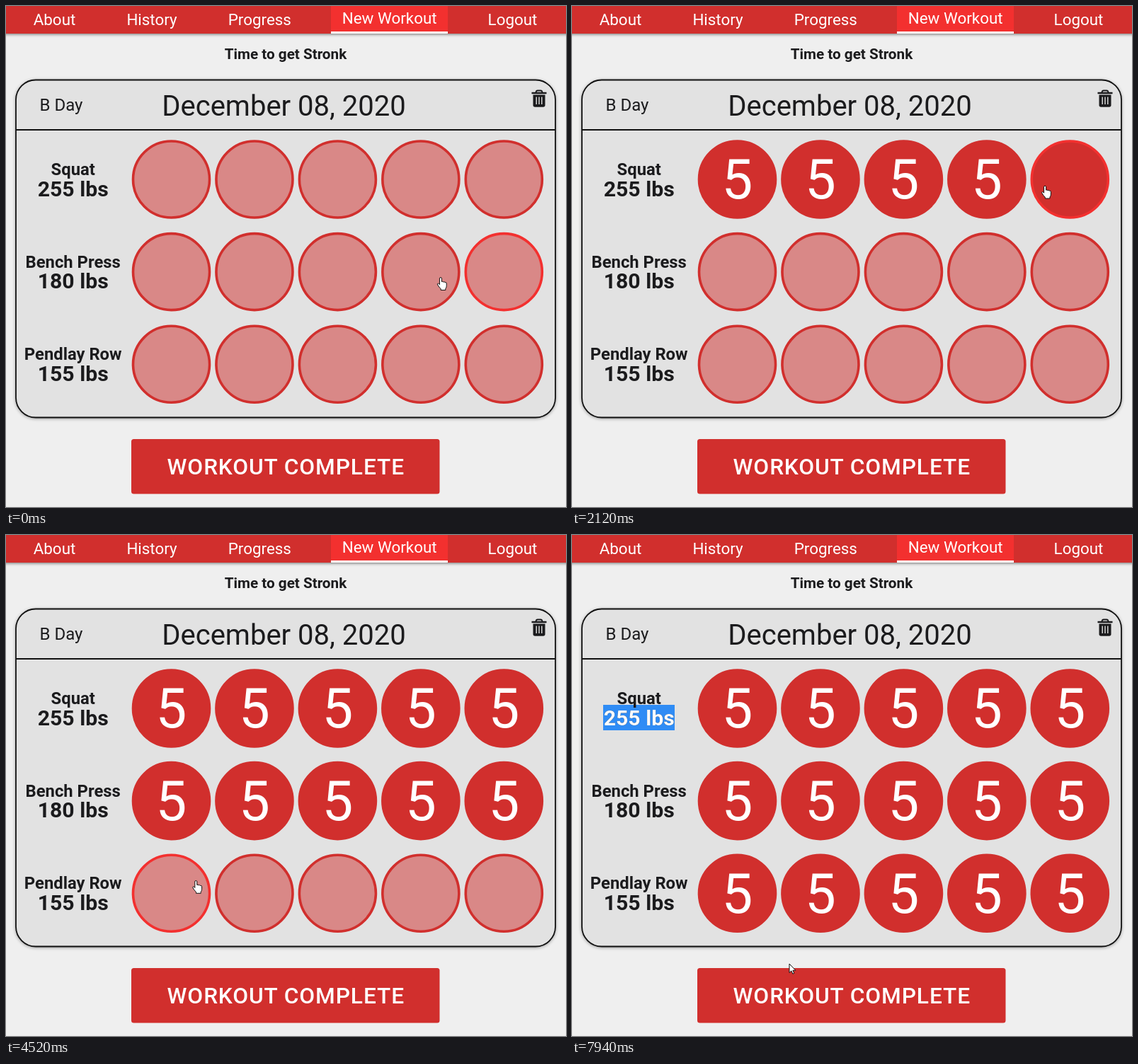
Write an HTML page that moves like this. It is 791 px wide and 708 px high and loops after 8 s.

```html
<!DOCTYPE html>
<html lang="en">
<head>
<meta charset="utf-8">
<title>Workout log</title>
<style>
  html, body { margin: 0; width: 100%; height: 100%; overflow: hidden; background: #efefef; }
  svg { display: block; font-family: Roboto, sans-serif; fill: #1b1b1d; }
  text { text-anchor: middle; }
  .nav { font-size: 22.4px; fill: #fff; }
  .title { font-size: 20.7px; font-weight: 700; }
  .day { font-size: 24px; }
  .date { font-size: 40px; }
  .lift { font-size: 23.8px; font-weight: 700; }
  .load { font-size: 30.2px; font-weight: 700; }
  .done { font-size: 31.7px; font-weight: 500; letter-spacing: .0286em; fill: #fff; }
  .reps { font-size: 78px; fill: #fff; }
  .bar { filter: drop-shadow(0 1px 2px #0008); }
  .card { filter: drop-shadow(0 1px 2px #0005); }
  .cursor path { fill: #fff; stroke: #111; stroke-width: 1; stroke-linejoin: round; }
  .cursor #beam { fill: none; }
</style>
</head>
<body>
<svg width="791" height="708" viewBox="0 0 791 708">
  <rect class="bar" x="-5" y="-5" width="801" height="44" fill="#d12f2d"/>
  <rect x="459" width="165" height="39" fill="#f3302f"/>
  <rect x="459" y="36" width="165" height="3" fill="#fff"/>
  <g class="nav">
    <text x="68.5" y="27">About</text>
    <text x="206" y="27">History</text>
    <text x="358.3" y="27">Progress</text>
    <text x="541.7" y="25">New Workout</text>
    <text x="715.5" y="27">Logout</text>
  </g>
  <text class="title" x="395" y="75">Time to get Stronk</text>

  <rect class="card" x="14" y="104.5" width="762" height="477" rx="28" fill="#e2e2e2" stroke="#111" stroke-width="1.8"/>
  <path d="M14 175H776" stroke="#111" stroke-width="1.8"/>
  <text class="day" x="78" y="148">B Day</text>
  <text class="date" x="392.5" y="154.5">December 08, 2020</text>
  <g stroke="#1b1b1d" fill="none">
    <path d="M742.5 123H763.5" stroke-width="2.5"/>
    <path d="M748.5 122.5q0-3 2.5-3h4q2.5 0 2.5 3" stroke-width="1.8"/>
    <path d="M744.5 125.5H761.5V140q0 2.8-2.8 2.8H747.3q-2.8 0-2.8-2.8Z" fill="#1b1b1d" stroke="none"/>
    <path d="M749.2 128.5V139M753 128.5V139M756.8 128.5V139" stroke="#e2e2e2" stroke-width="1.4"/>
  </g>

  <rect id="mark" x="44" y="240" width="0" height="36" fill="#2f8cf5"/>
  <clipPath id="picked"><rect id="clip" x="44" y="240" width="0" height="36"/></clipPath>
  <g id="rows"></g>
  <text class="load" x="94.7" y="268.5" style="fill:#fff" clip-path="url(#picked)">255 lbs</text>

  <rect x="177" y="612" width="435.5" height="77.5" rx="3.5" fill="#d12f2d"/>
  <text class="done" x="395.3" y="661.5">WORKOUT COMPLETE</text>

  <g id="cursor" class="cursor">
    <path id="arrow" d="M0 0V12.5L2.9 9.9 4.8 14.2 6.8 13.3 4.9 9.2H8.8Z"/>
    <path id="hand" d="M-1.7 1.7a1.5 1.5 0 0 1 3 0V6.2q1.4-.9 2.4.4 1.4-.7 2.3.5 2-.4 2.1 1.5V12q0 2.5-1.4 4v2H0v-1.8q-2.6-2.4-4.4-5.6-.9-1.8.6-2 1 0 2.1 1.6z"/>
    <path id="beam" d="M-3-6.5h2l1 .7 1-.7h2M0-6V6M-3 6.5h2l1-.7 1 .7h2"/>
  </g>
</svg>
<script>
const LOOP = 8000, RED = '#d12f2d', BRIGHT = '#f3302f', PINK = '#d98887';
const HOVER_LAG = 40, TEXT_LAG = 100, HOP = 145;
const DRAG = 6900, DROP = 7400;
const $ = id => document.getElementById(id);
const mix = (a, b, k) => a + (b - a) * k;
const easeOut = k => 1 - (1 - k) ** 3;

function add(tag, attrs, text = '') {
  const el = document.createElementNS('http://www.w3.org/2000/svg', tag);
  for (const k in attrs) el.setAttribute(k, attrs[k]);
  el.textContent = text;
  return $('rows').appendChild(el);
}

// first: first click, gap: time between clicks,
// from, to: where the pointer rests in the first and last set, off its centre
const lifts = [
  { name: 'Squat', lbs: 255, first: 680, gap: 360, from: [-10, -3], to: [-35, 9] },
  { name: 'Bench Press', lbs: 180, first: 2690, gap: 350, from: [12, -10], to: [-20, -10] },
  { name: 'Pendlay Row', lbs: 155, first: 4740, gap: 285, from: [35, -18], to: [-25, 21] }
];

const home = { x: 724, y: 398 };
const hops = [{ at: -50, time: HOP, x: 573, y: 378 }];
const sets = [];

lifts.forEach(({ name, lbs, first, gap, from, to }, row) => {
  const dy = row * 130.65;
  add('text', { class: 'lift', x: 94.7, y: 239 + dy }, name);
  add('text', { class: 'load', x: 94.7, y: 268.5 + dy }, lbs + ' lbs');

  for (let col = 0; col < 5; col++) {
    const x = 233.5 + col * 117.45, y = 245 + dy;
    const last = sets.length ? sets[sets.length - 1].click : 0;
    // Straight on to the next set, with a pause before a new row
    const move = col ? { at: last, time: HOP }
      : row ? { at: last + 200, time: 230 } : { at: 90, time: 390 };
    hops.push({ ...move, x: x + mix(from[0], to[0], col / 4), y: y + mix(from[1], to[1], col / 4) });
    sets.push({
      x, y, click: first + col * gap,
      disc: add('circle', { cx: x, cy: y, r: 54, 'stroke-width': 3.6 }),
      reps: add('text', { class: 'reps', x, y: y + 27.4 }, '5')
    });
  }
});

// Over to the first load, drag across it, then down to the button
hops.push(
  { at: 5980, time: 390, x: 68, y: 317 },
  { at: 6400, time: 340, x: 47, y: 261 },
  { at: DRAG, time: 320, x: 144.5, y: 254 },
  { at: 7800, time: 140, x: 307, y: 606 }
);

function pointer(t) {
  let { x, y } = home;
  for (const hop of hops) {
    if (t <= hop.at) break;
    const k = easeOut(Math.min(1, (t - hop.at) / hop.time));
    x = mix(x, hop.x, k);
    y = mix(y, hop.y, k);
  }
  return { x, y };
}

const under = p => sets.find(s => Math.hypot(p.x - s.x, p.y - s.y) < 55.8);

function draw(t) {
  const pos = pointer(t), hot = under(pointer(t - HOVER_LAG));
  for (const s of sets) {
    s.disc.setAttribute('fill', t >= s.click ? RED : PINK);
    s.disc.setAttribute('stroke', s === hot ? BRIGHT : RED);
    s.reps.setAttribute('visibility', t >= s.click + TEXT_LAG ? 'visible' : 'hidden');
  }
  const width = t < DRAG ? 0 : Math.min(101, pos.x - 43.5);
  $('mark').setAttribute('width', width);
  $('clip').setAttribute('width', width);

  const onText = t < DROP && pos.x < 150 && pos.y < 276;
  const shape = onText ? 'beam' : under(pos) ? 'hand' : 'arrow';
  for (const id of ['arrow', 'hand', 'beam'])
    $(id).setAttribute('visibility', id === shape ? 'visible' : 'hidden');
  $('cursor').setAttribute('transform', `translate(${pos.x} ${pos.y})`);
}

const start = performance.now();
function tick() {
  draw((performance.now() - start) % LOOP);
  requestAnimationFrame(tick);
}
tick();
</script>
</body>
</html>
```
